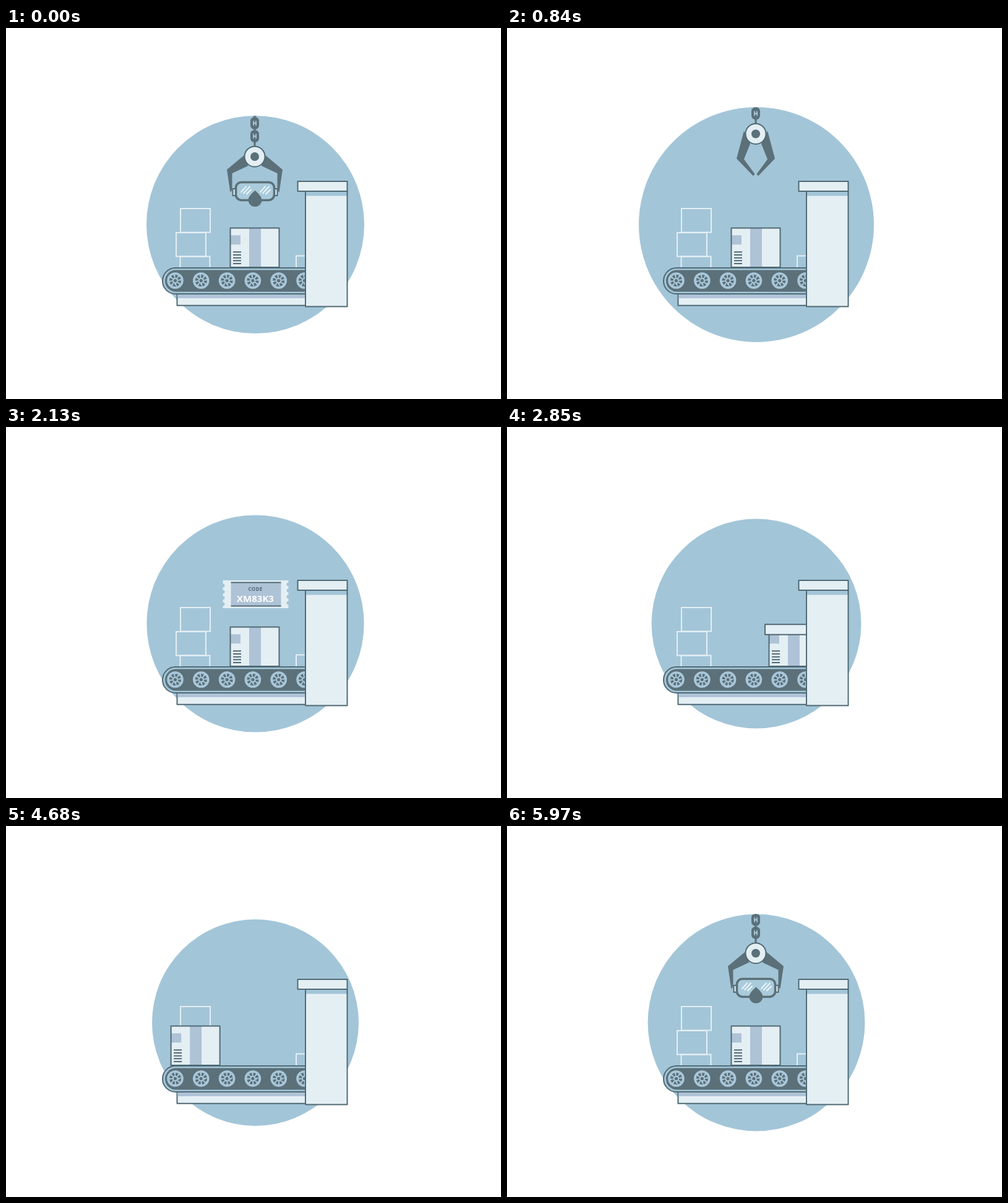
An HTML page that plays this animation: 800x600 px, repeating every 6 s.

```html
<!DOCTYPE html>
<html lang="en">
<head>
<meta charset="utf-8">
<title>Packing line</title>
<style>
  html, body { margin: 0; width: 100%; height: 100%; overflow: hidden; background: #fff; }
  svg { display: block; width: 800px; height: 600px; }
  .sky { fill: #a3c5d8; }
  .light { fill: #e4eff4; }
  .dark { fill: #5b7079; }
  .shade { fill: #afc3d7; }
  .edge { stroke: #506a75; stroke-width: 2; stroke-linejoin: round; }
  .ghost { fill: none; stroke: #e4eff4; stroke-width: 2; }
  .line { fill: none; stroke: #506a75; stroke-width: 2; }
  text { font-family: "Open Sans", Inter, sans-serif; font-weight: 700; text-anchor: middle; }
</style>
</head>
<body>
<svg viewBox="0 0 800 600" xmlns="http://www.w3.org/2000/svg">
  <defs>
    <clipPath id="round"><circle id="clip" cx="403" cy="318" r="176"/></clipPath>
    <g id="link">
      <rect class="dark" x="-7" y="-10" width="14" height="20" rx="6.5"/>
      <rect class="sky" x="-3" y="-4.5" width="6" height="9" rx="2"/>
      <path d="M0-12V-1.3M0 1.3V12" stroke="#5b7079" stroke-width="2.6"/>
    </g>
    <g id="wheel">
      <circle r="13.3" fill="#a9c7da"/>
      <circle r="7.2" fill="none" stroke="#5b7079" stroke-width="4.8" pathLength="80" stroke-dasharray="6.3 3.7"/>
      <circle class="dark" r="2.6"/>
    </g>
  </defs>

  <circle id="disc" class="sky" cx="403" cy="318" r="176"/>

  <g class="ghost">
    <rect x="282" y="292" width="48" height="38.5"/>
    <rect x="275" y="331" width="48" height="38.5"/>
    <rect x="281.5" y="369.5" width="48" height="20"/>
    <rect x="469" y="368.5" width="30" height="20"/>
  </g>

  <g clip-path="url(#round)">
    <g id="ticket">
      <path id="paper" class="light"/>
      <rect class="shade" x="-39.5" y="-19" width="81" height="38"/>
      <path class="line" d="M-39.5-19h81M-39.5 19h81"/>
      <text y="-5.5" font-size="8" letter-spacing=".3" fill="#506a75">CODE</text>
      <text y="12.8" font-size="15" fill="#fff">XM83K3</text>
    </g>
    <g id="goggles">
      <rect class="light edge" x="-36" y="-4" width="5" height="11" stroke-width="1.5"/>
      <rect class="light edge" x="31" y="-4" width="5" height="11" stroke-width="1.5"/>
      <rect x="-31" y="-14.5" width="62" height="29" rx="9" fill="#a9cbdc" stroke="#5b7079" stroke-width="3.6"/>
      <path d="M-23 2l9-10M-19 4l11-12M-14 5l8-8M8 2l9-10M12 4l11-12M17 5l8-8" stroke="#eef6fa" stroke-width="2"/>
      <path class="dark" d="M0-1.5C3 2 11 8 11 14A11 11 0 0 1-11 14C-11 8-3 2 0-1.5Z"/>
    </g>
    <g id="claw">
      <use href="#link" y="-33"/>
      <use href="#link" y="-54"/>
      <use href="#link" y="-75"/>
      <use href="#link" y="-96"/>
      <path d="M0-24V-15" stroke="#5b7079" stroke-width="3"/>
      <polygon id="armL" class="dark"/>
      <polygon id="armR" class="dark" transform="scale(-1 1)"/>
      <circle class="light edge" r="16.5"/>
      <circle class="dark" r="7"/>
    </g>
  </g>

  <g id="box">
    <rect class="light" x="-39.5" y="-31.75" width="79" height="63.5"/>
    <rect class="shade" x="-9" y="-31.75" width="19" height="63.5"/>
    <rect class="shade" x="-39" y="-20" width="16" height="15"/>
    <path class="line" d="M-35 7h13M-35 11.7h13M-35 16.4h13M-35 21h13M-35 25.7h13"/>
    <rect class="line" x="-39.5" y="-31.75" width="79" height="63.5" stroke-linejoin="round"/>
    <rect id="lid" class="light edge" x="-46" y="-36" width="92" height="16.5"/>
  </g>

  <rect class="light edge" x="276.5" y="428" width="212" height="20.8"/>
  <rect class="shade" x="277.5" y="430" width="210" height="7"/>
  <rect class="sky edge" x="253" y="388" width="270" height="42" rx="21"/>
  <rect class="dark" x="257" y="391.5" width="262" height="35" rx="17.5"/>
  <g id="wheels"></g>

  <g id="tower">
    <rect class="light" x="484" y="264" width="67.5" height="186.5"/>
    <rect class="sky" x="484" y="264" width="67.5" height="7.5"/>
    <rect class="line" x="484" y="264" width="67.5" height="186.5" stroke-linejoin="round"/>
    <rect class="light edge" x="471.5" y="248" width="80" height="16"/>
  </g>
</svg>
<script>
const LOOP = 6000;
const $ = id => document.getElementById(id);
const set = (id, name, value) => $(id).setAttribute(name, value);
const move = (id, x, y, s = 1) => set(id, 'transform', `translate(${x} ${y}) scale(${s})`);
const show = (id, on) => { $(id).style.display = on ? '' : 'none'; };

const part = (t, a, b) => Math.min(1, Math.max(0, (t - a) / (b - a)));
const mix = (a, b, p) => a + (b - a) * p;
const easeIn = p => p * p;
const easeOut = p => 1 - (1 - p) * (1 - p);
const easeBoth = p => p < .5 ? 2 * p * p : 1 - 2 * (1 - p) * (1 - p);

const ARM_SHUT = [[-19, -5], [-31, 40], [-4, 68], [-1.5, 65], [-19, 41], [-9, 16]];
const ARM_OPEN = [[-15, -4], [-45, 21], [-39.5, 58], [-36.5, 54], [-36.5, 27], [-11, 15]];

// Ticket outline with scalloped short sides
const bites = dir => `v${dir * 3.5}` + `a3 3 0 0 ${dir > 0 ? 0 : 0} 0 ${dir * 6}v${dir * 4}`.repeat(4);
$('paper').setAttribute('d', `M-52.5-22.5H53.5${bites(1)}V22.5H-52.5${bites(-1)}Z`);

const wheels = [];
for (let i = 0; i < 6; i++) {
  const w = document.createElementNS('http://www.w3.org/2000/svg', 'use');
  w.setAttribute('href', '#wheel');
  $('wheels').append(w);
  wheels.push(w);
}

function radius(t) {
  if (t >= 4860) return 167 + 26 * Math.pow((t - 4860) / 1740, 2.5);
  if (t < 600) return 167 + 26 * Math.pow((t + 1140) / 1740, 2.5);
  return 167 + 26 * Math.pow(1 - part(t, 600, 3300), 1.32);
}

function drawClaw(t) {
  const u = t > 5000 ? t - LOOP : t;
  const active = u >= -690 && u < 1200;
  show('claw', active);
  show('goggles', active && u < 500);
  if (!active) return;
  let y = mix(68, 214.2, easeOut(part(u, -690, 180)));
  const held = y;
  if (u > 480) y -= 43 * easeIn((u - 480) / 360);
  move('claw', 402, y);
  const open = 1 + .12 * easeOut(part(u, 180, 260)) - 1.12 * easeBoth(part(u, 380, 720));
  const pts = ARM_SHUT.map((p, i) => p.map((v, k) => mix(v, ARM_OPEN[i][k], open)).join()).join(' ');
  set('armL', 'points', pts);
  set('armR', 'points', pts);
  move('goggles', 402.5, held + 56 + 82 * easeIn(part(u, 180, 420)));
}

function drawTicket(t) {
  show('ticket', t > 1200 && t < 2340);
  const fall = easeIn(part(t, 2130, 2330));
  const y = mix(90, 270.5, easeOut(part(t, 1200, 1620))) + 85 * fall;
  move('ticket', 403, y, 1 - .35 * fall);
}

function drawBox(t) {
  const out = easeBoth(part(t, 2500, 3250));
  const next = easeBoth(part(t, 4600, 5640));
  show('box', t < 3250 || t > 3840);
  show('lid', t > 2250 && t < 3500);
  move('lid', 0, -175 * (1 - easeIn(part(t, 2250, 2470))));
  if (t < 3500) {
    move('box', 402 + 140 * out, 355.25);
    $('box').style.opacity = 1;
  } else {
    const pop = easeOut(part(t, 3840, 4080));
    const y = mix(328, 236, pop) + 119.25 * easeIn(part(t, 4080, 4280));
    move('box', mix(305, 402, next), y, pop);
    $('box').style.opacity = Math.min(1, pop * 1.15);
  }
  const angle = 630 * out + 450 * next;
  wheels.forEach((w, i) =>
    w.setAttribute('transform', `translate(${273.5 + 41.8 * i} 408.5) rotate(${angle})`));
}

function draw(time) {
  const t = Math.floor(time % LOOP / 30) * 30;
  const r = radius(t);
  set('disc', 'r', r);
  set('clip', 'r', r);
  drawClaw(t);
  drawTicket(t);
  drawBox(t);
  move('tower', 0, 4 * Math.sin(Math.PI * part(t, 3580, 3800)));
}

const start = performance.now();
function tick() {
  draw(performance.now() - start);
  requestAnimationFrame(tick);
}
tick();
</script>
</body>
</html>
```
